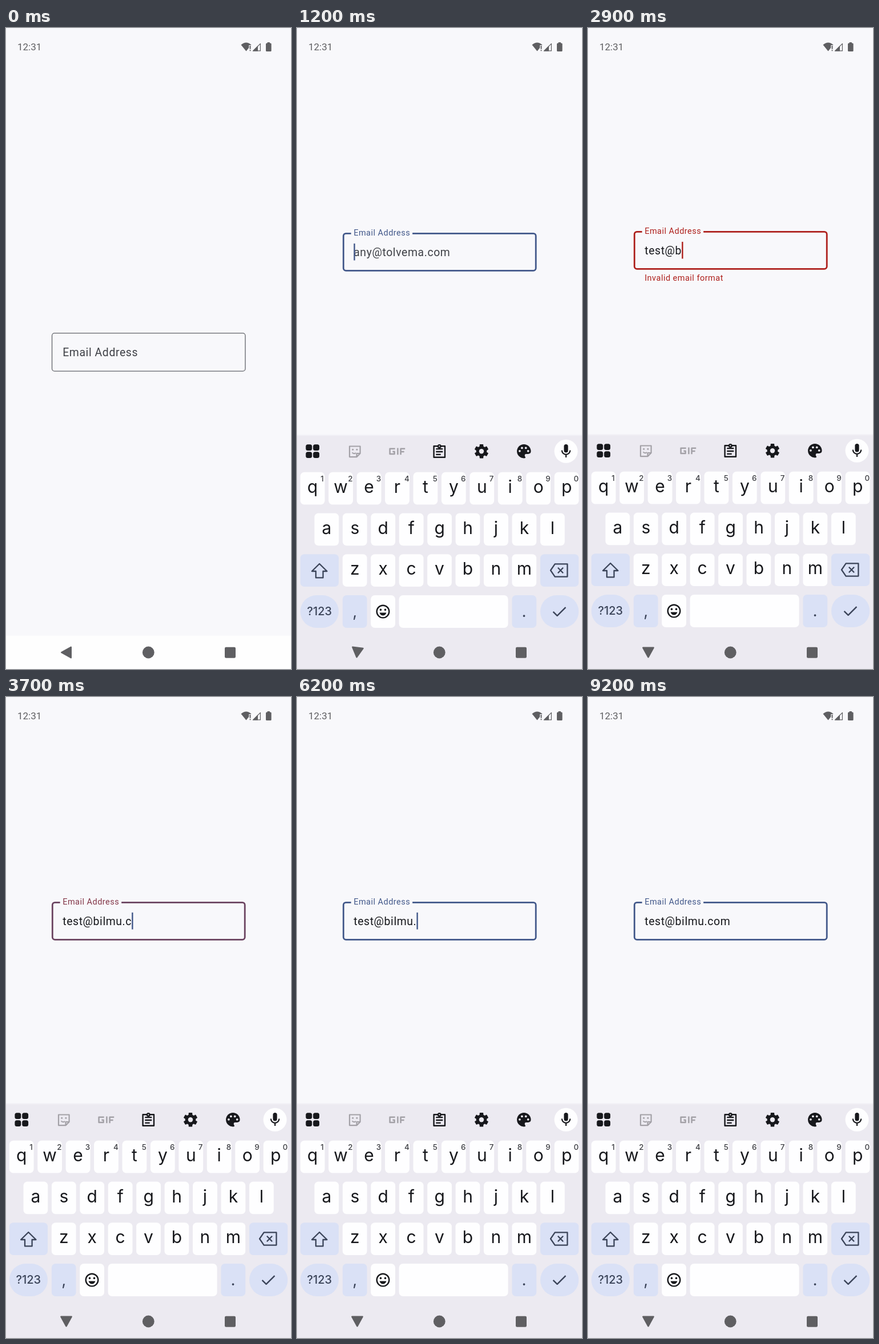
Animation, 499 px wide and 1121 px high, one loop 9700 ms. Source, as an HTML page with a canvas:

```html
<!DOCTYPE html>
<html lang="en">
<head>
<meta charset="utf-8">
<title>Email field validation</title>
<style>
html, body { margin: 0; width: 100%; height: 100%; overflow: hidden; background: #f8f8fb; }
canvas { display: block; width: 499px; height: 1121px; }
</style>
</head>
<body>
<canvas id="stage"></canvas>
<script>
const W = 499, H = 1121, LOOP = 9700, STEP = 100;
const canvas = document.getElementById('stage');
const dpr = window.devicePixelRatio || 1;
canvas.width = W * dpr;
canvas.height = H * dpr;
const c = canvas.getContext('2d');

const BG = '#f8f8fb', PANEL = '#eceaf1', KEY = '#fefeff', TINT = '#dae1f6';
const INK = '#17181c', SLATE = '#3b4459', MUTED = '#a3a1a7', SYS = '#5f5f62', BODY = '#3e4046';
const BLUE = [66, 88, 138], RED = [174, 32, 28], GREY = [98, 100, 106], DARK = [62, 64, 70];
const UI = 'Roboto, sans-serif', KEYS = 'Inter, sans-serif';

const ADDRESS = 'test@bilmu.com', HINT = 'any@tolvema.com';
// [time, number of characters in the field]
const TYPING = [
  [900, 0], [1500, 1], [1600, 2], [1700, 3], [1800, 4], [2200, 5],
  [2900, 6], [3000, 7], [3100, 8], [3200, 9], [3500, 10],
  [3700, 12], [3800, 13], [3900, 14], [5000, 13], [5200, 12], [5300, 11],
  [5500, 10], [6000, 11], [6100, 11], [6600, 13], [6700, 14]
];

const clamp = v => Math.max(0, Math.min(1, v));
const mix = (a, b, p) => a + (b - a) * p;
const smooth = p => { p = clamp(p); return p * p * (3 - 2 * p); };
const blend = (a, b, p) => `rgb(${a.map((v, i) => Math.round(mix(v, b[i], p)))})`;

// Cubic curve (0.4, 0) (0.2, 1)
function standard(x) {
  if (x <= 0) return 0;
  if (x >= 1) return 1;
  let lo = 0, hi = 1;
  for (let i = 0; i < 24; i++) {
    const u = (lo + hi) / 2, v = 1 - u;
    if (1.2 * u * v * v + 0.6 * u * u * v + u * u * u < x) lo = u; else hi = u;
  }
  return lo * lo * (3 - 2 * lo);
}

function box(x, y, w, h, r, fill) {
  c.beginPath();
  c.roundRect(x, y, w, h, r);
  c.fillStyle = fill;
  c.fill();
}

function disc(x, y, r, fill) {
  c.beginPath();
  c.arc(x, y, r, 0, Math.PI * 2);
  c.fillStyle = fill;
  c.fill();
}

function line(d, width, color) {
  c.lineWidth = width;
  c.strokeStyle = color;
  c.stroke(new Path2D(d));
}

function shape(d, color) {
  c.fillStyle = color;
  c.fill(new Path2D(d));
}

function text(s, x, y, font, color, align = 'left', spacing = 0) {
  c.font = font;
  c.letterSpacing = spacing + 'px';
  c.textAlign = align;
  c.fillStyle = color;
  c.fillText(s, x, y);
}

function at(x, y, draw) {
  c.save();
  c.translate(x, y);
  draw();
  c.restore();
}

function stateAt(t) {
  const s = { count: 0, last: 0, error: false, flip: -1e4, focus: t >= 900 };
  for (const [time, count] of TYPING) {
    if (time > t) break;
    const bad = count > 0 && !ADDRESS.slice(0, count).includes('.');
    if (bad !== s.error) { s.error = bad; s.flip = time; }
    s.count = count;
    s.last = time;
  }
  s.text = ADDRESS.slice(0, s.count);
  s.cursor = s.focus && Math.floor((t - s.last) / 500) % 2 === 0;
  return s;
}

function statusBar() {
  text('12:31', 20, 38.5, '17px ' + UI, SYS);
  shape('M420.5 40.5L411.5 29.5Q420.5 21.5 429.5 29.5Z', SYS);
  c.fillStyle = BG;
  c.fillRect(425.3, 30, 5, 11);
  c.fillStyle = SYS;
  c.fillRect(426.6, 31, 1.9, 5.8);
  c.fillRect(426.6, 38.3, 1.9, 1.9);
  shape('M431.5 40.5L441 31V40.5Z', SYS);
  line('M432.8 39.9L445.4 27.3V39.9Z', 1.2, SYS);
  box(455, 26.5, 9.6, 14.5, 1.5, SYS);
  box(457.6, 25, 4.4, 3, 0.6, SYS);
}

function navBar(t) {
  at(105.5, 1092, () => {
    c.rotate(-Math.PI / 2 * smooth((t - 950) / 300));
    const d = 'M-8.3 0L8.3 -9.2V9.2Z';
    shape(d, SYS);
    line(d, 2.4, SYS);
  });
  disc(249.3, 1092, 10.4, SYS);
  box(383, 1082.7, 19, 19, 2.2, SYS);
}

function field(t, s, slide) {
  const p = standard((t - 870) / 140);
  const since = t - s.flip;
  const turn = (start, mid) => {
    const k = since < 100 ? mix(start, mid, since / 100) : mix(mid, 1, clamp((since - 100) / 100));
    return s.error ? k : 1 - k;
  };
  const accent = k => BLUE.map((v, i) => mix(v, RED[i], k));
  const edge = blend(GREY, accent(turn(0.62, 0.92)), p);
  const labelColor = blend(DARK, accent(turn(0.4, 0.85)), p);
  const x = 79.9, w = 339.7, h = 67.8, tx = 99.2;
  const top = 357.9 + Math.round(175 * (1 - slide)) - (s.error ? 3 : 0);

  const lw = mix(1.3, 2.8, p), half = lw / 2;
  c.save();
  if (p > 0) {
    const gap = 107.5 * p, mid = 148.4;
    c.beginPath();
    c.rect(0, 0, W, H);
    c.rect(mid - gap / 2, top - 2, gap, 8);
    c.clip('evenodd');
  }
  c.beginPath();
  c.roundRect(x + half, top + half, w - lw, h - lw, 4.4);
  c.lineWidth = lw;
  c.strokeStyle = edge;
  c.stroke();
  c.restore();

  text('Email Address', tx, top + mix(40.6, 4.6, p), mix(19.4, 14.5, p) + 'px ' + UI,
    labelColor, 'left', mix(0.6, 0.48, p));

  const font = '19.4px ' + UI, base = top + 40.6;
  if (s.focus && !s.count) {
    c.globalAlpha = clamp((t - 920) / 80);
    text(HINT, tx, base, font, BODY, 'left', 0.6);
    c.globalAlpha = 1;
  }
  text(s.text, tx, base, font, INK, 'left', 0.6);
  if (s.cursor) {
    const end = tx + (s.count ? c.measureText(s.text).width : 0);
    c.fillStyle = blend(BLUE, RED, s.error ? 1 : 0);
    c.fillRect(end + 0.1, top + 19, 2.4, 29.5);
  }
  if (s.error) text('Invalid email format', tx, top + 87.4, '14.5px ' + UI, blend(RED, RED, 0), 'left', 0.48);
}

function toolIcons() {
  at(101.3, 739.8, () => {
    line('M-9.3 -9.3H9.3V3.2L3.2 9.3H-9.3ZM9 3.2H3.2V9', 2.2, MUTED);
    line('M-4.8 1.5Q-1.5 5 1.8 2.2', 1.8, MUTED);
    disc(-3.6, -3.6, 1.5, MUTED);
    disc(3.6, -3.6, 1.5, MUTED);
  });
  at(175, 739.4, () =>
    line('M-3.3 -4.6H-12.4V4.6H-4.4V0.4H-7.6M1.4 -5.8V5.8M6.6 5.8V-4.6H14.2M6.6 0.6H12.6', 2.5, MUTED));
  at(249.3, 740, () => {
    line('M-9.7 -9.7H9.7V9.7H-9.7Z', 2.4, INK);
    line('M-6 -4.8H6M-6 0H6M-6 4.8H2.4', 2.3, INK);
    disc(0, -9.6, 3.5, INK);
    disc(0, -9.6, 1.1, PANEL);
  });
  at(323, 739.2, () => {
    for (let i = 0; i < 3; i++) {
      box(-3.3, -12.2, 6.6, 24.4, 1, INK);
      c.rotate(Math.PI / 3);
    }
    disc(0, 0, 9.3, INK);
    disc(0, 0, 4.2, PANEL);
  });
  at(397.3, 739.2, () => {
    disc(0, 0, 12.2, INK);
    shape('M2 13Q3.5 10.5 1.6 8.6Q0.6 5 4 4.8H7.5Q11 4.6 12.6 1.6V13Z', PANEL);
    for (const [x, y] of [[-7.4, -0.4], [-3.4, -5.8], [3.4, -5.8], [7.4, -0.4]]) disc(x, y, 1.9, PANEL);
  });
}

function suggestions(word) {
  c.fillStyle = '#c8c6cd';
  c.fillRect(177.6, 725, 1.2, 29);
  c.fillRect(319.2, 725, 1.2, 29);
  text(word, 114.5, 747, '20px ' + KEYS, INK, 'center');
  text(word, 248.3, 733, '500 18.6px ' + KEYS, INK, 'center');
  text(ADDRESS.slice(4), 248.3, 758, '13.4px ' + KEYS, INK, 'center');
  text('testing', 381.5, 747, '20px ' + KEYS, INK, 'center');
}

function keyRow(letters, x, y, digits) {
  [...letters].forEach((ch, i) => {
    const kx = x + i * 49.43;
    box(kx, y, 42.8, 56.8, 7, KEY);
    text(ch, kx + 21.4, y + 36.2, '30px ' + KEYS, INK, 'center');
    if (digits) text((i + 1) % 10, kx + 38.2, y + 15.8, '500 13.4px ' + KEYS, '#3c3d42', 'center');
  });
}

function keyboard(s) {
  c.fillStyle = '#f1f0f5';
  c.fillRect(0, 710.5, W, 3);
  c.fillStyle = PANEL;
  c.fillRect(0, 712.5, W, H);

  for (const x of [15.4, 28.2]) for (const y of [727.2, 740.2]) box(x, y, 10.9, 10.9, 3.6, INK);
  if (s.count > 0 && s.count < 5) suggestions(s.text); else toolIcons();

  disc(471, 739.2, 20.5, KEY);
  box(467.4, 727, 7.2, 14.6, 3.6, INK);
  line('M463.8 737.6A7.2 7.2 0 0 0 478.2 737.6M471 745V750', 2.2, INK);

  keyRow('qwertyuiop', 5.8, 775.8, true);
  keyRow('asdfghjkl', 30.5, 847.5);
  keyRow('zxcvbnm', 79.8, 919.2);

  box(5.8, 919.2, 67.2, 56.8, 7, TINT);
  line('M39.3 936L52.5 949H45.6V960.4H33V949H26.1Z', 2.3, SLATE);
  box(426, 919.2, 67.2, 56.8, 7, TINT);
  line('M444 947.5L451.6 936.4H473.4V958.6H451.6ZM456.8 942.8L466 952.2M466 942.8L456.8 952.2', 2.3, SLATE);

  const y = 991;
  box(5.8, y, 67.2, 57, 28.5, TINT);
  text('?123', 39.3, 1026, '500 20px ' + KEYS, SLATE, 'center');
  box(79.8, y, 42.8, 57, 7, TINT);
  text(',', 101.2, 1029, '28px ' + KEYS, SLATE, 'center');
  box(129.2, y, 42.8, 57, 7, KEY);
  at(150.5, 1019.6, () => {
    c.beginPath();
    c.arc(0, 0, 10.8, 0, Math.PI * 2);
    c.lineWidth = 2.4;
    c.strokeStyle = INK;
    c.stroke();
    disc(-4, -3.2, 1.8, INK);
    disc(4, -3.2, 1.8, INK);
    shape('M-6 1.8H6Q4.3 6.8 0 6.8Q-4.3 6.8 -6 1.8Z', INK);
  });
  box(178.6, y, 191, 57, 7, KEY);
  box(376.4, y, 42.8, 57, 7, TINT);
  text('.', 397.6, 1029, '28px ' + KEYS, SLATE, 'center');
  box(426, y, 67.2, 57, 28.5, TINT);
  line('M448.5 1019.8L455.6 1026.8L470.4 1012.2', 2.4, SLATE);
}

function render(t) {
  const s = stateAt(t);
  const slide = standard((t - 877.8) / 347);
  c.setTransform(dpr, 0, 0, dpr, 0, 0);
  c.lineJoin = 'round';
  c.fillStyle = BG;
  c.fillRect(0, 0, W, H);
  statusBar();
  field(t, s, slide);
  if (s.focus) {
    at(0, Math.round(351 * (1 - slide)), () => keyboard(s));
  } else {
    c.fillStyle = '#fefefe';
    c.fillRect(0, 1062.5, W, H);
  }
  navBar(t);
}

const start = performance.now();
function tick() {
  const t = (performance.now() - start) % LOOP;
  render(Math.floor(t / STEP) * STEP);
  requestAnimationFrame(tick);
}
tick();
</script>
</body>
</html>
```
